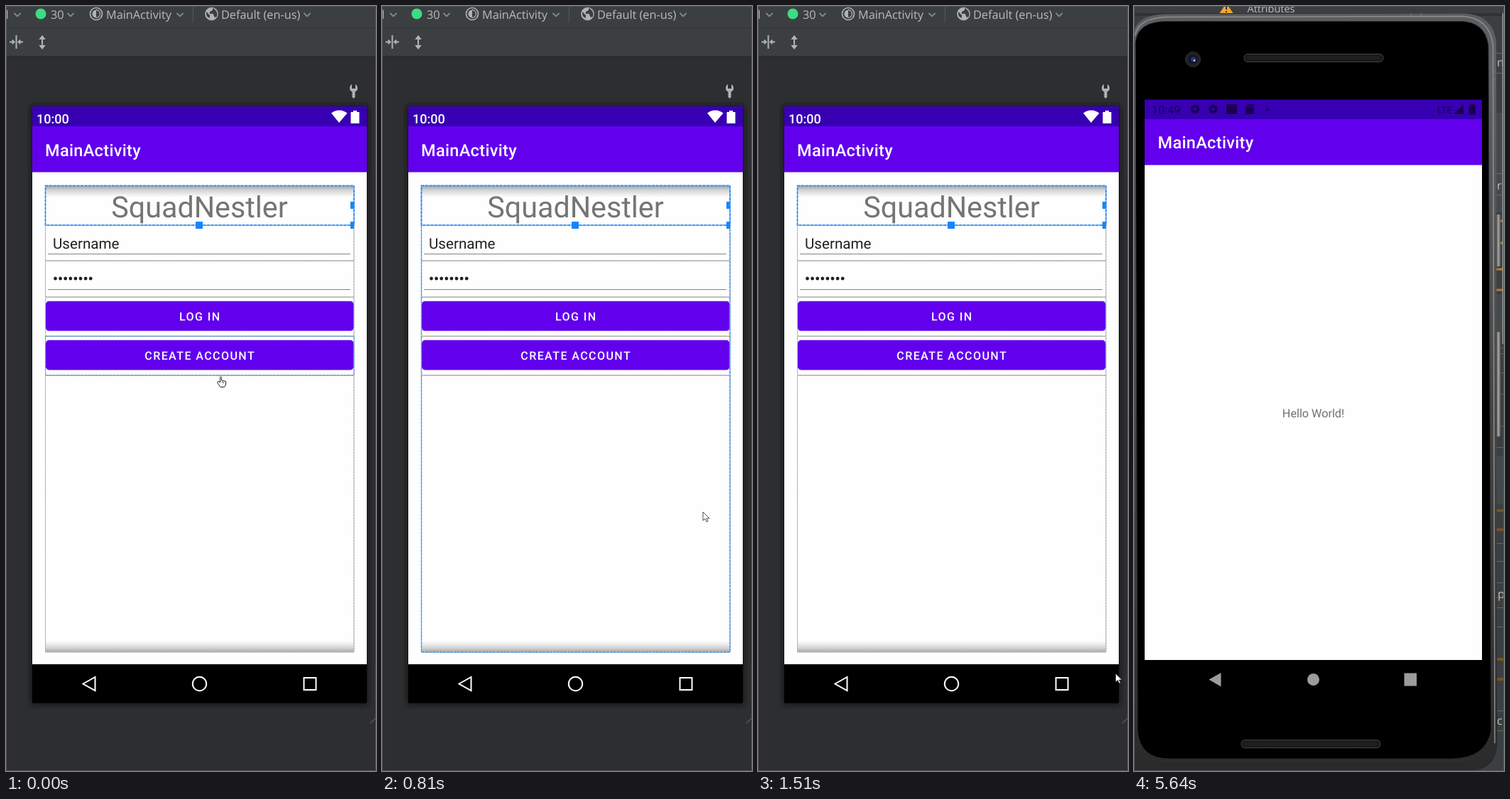
These frames come from a looping animation (521 by 1075 pixels, 8 s). An HTML page:

```html
<!DOCTYPE html>
<html lang="en">
<head>
<meta charset="utf-8">
<style>
  html, body { margin: 0; width: 100%; height: 100%; overflow: hidden; background: #2d2e30; }
  svg { display: block; width: 521px; height: 1075px; font-family: Roboto, sans-serif; text-rendering: geometricPrecision; }
  .ide { font: 16.25px 'Open Sans', sans-serif; fill: #bbb; }
  .mid { text-anchor: middle; }
  .bar { font-size: 23.5px; font-weight: 500; letter-spacing: .32px; fill: #fff; }
  .button { font-size: 16px; font-weight: 500; letter-spacing: 1.43px; fill: #fff; text-anchor: middle; }
  .bounds { fill: none; stroke: #cbcbcb; }
  .dashed { fill: none; stroke: #adadad; stroke-dasharray: 3 1; }
  .hover { fill: none; stroke: #4f9ae2; stroke-dasharray: 4 1; }
  .hidden { display: none; }
</style>
</head>
<body>
<svg viewBox="0 0 521 1075">
  <defs>
    <linearGradient id="shade" x2="0" y2="1">
      <stop offset="0" stop-color="#a6a6a6"/><stop offset=".35" stop-color="#d2d2d2"/>
      <stop offset=".75" stop-color="#efefef"/><stop offset="1" stop-color="#fdfdfd"/>
    </linearGradient>
    <linearGradient id="metal" x2="0" y2="1">
      <stop offset="0" stop-color="#5c5d5e"/><stop offset=".06" stop-color="#606162"/>
      <stop offset=".5" stop-color="#484848"/><stop offset="1" stop-color="#2a2a2a"/>
    </linearGradient>
    <linearGradient id="key">
      <stop offset="0" stop-color="#444"/><stop offset=".5" stop-color="#aaa"/><stop offset="1" stop-color="#555"/>
    </linearGradient>
    <filter id="blur" x="-5%" y="-5%" width="110%" height="110%"><feGaussianBlur stdDeviation="3"/></filter>
    <path id="chevron" d="M-4.5-2L0 2.5 4.5-2" fill="none" stroke="#85888a" stroke-width="1.8"/>
    <path id="gear" d="M0-5V5M-5 0H5M-3.6-3.6L3.6 3.6M-3.6 3.6L3.6-3.6" stroke-width="3.4" stroke-linecap="round"/>
    <path id="dividers" d="M55 358H490M55 409H490M55 464H490M55 519H490"/>
    <path id="layout" d="M55.5 252.5H490V908H55.5Z"/>
    <path id="title" d="M55.5 252.5H490V308H55.5Z"/>
    <g id="grille">
      <rect width="196" height="11" rx="5" fill="#191919" stroke="#444"/>
      <path d="M5 3.5H191M5 5.5H191M5 7.5H191" stroke="#303030" stroke-dasharray="1 1"/>
    </g>
  </defs>

  <g id="editor">
    <path d="M0 0H521V1075H0Z" fill="#2d2e30"/>
    <path d="M0 0H521V70H0Z" fill="#3c3f41"/>
    <path d="M0 30.5H521" stroke="#323436"/>
    <path d="M0 70.5H521" stroke="#2a2b2d"/>
    <path d="M263.5 0V23" stroke="#55585a"/>

    <g class="ide">
      <text x="-.5" y="17.5">l</text><text x="63" y="17.5">30</text>
      <text x="141" y="17.5">MainActivity</text><text x="303" y="17.5">Default (en-us)</text>
    </g>
    <use href="#chevron" x="16" y="12"/><use href="#chevron" x="91" y="12"/>
    <use href="#chevron" x="245" y="12"/><use href="#chevron" x="424" y="12"/>
    <circle cx="49" cy="11" r="7.5" fill="#3ddc84"/>
    <circle cx="127" cy="11" r="8.5" fill="none" stroke="#afb1b3" stroke-width="1.7"/>
    <path d="M127 5.5A5.5 5.5 0 0 0 127 16.5Z" fill="#afb1b3"/>
    <path d="M127 5.5A5.5 5.5 0 0 1 127 16.5" fill="none" stroke="#afb1b3" stroke-width="1.3"/>
    <circle cx="289.5" cy="11" r="9.3" fill="#afb1b3"/>
    <path d="M282 8l5 5v4q-6-2-5-9M291 3v3l-4 2v3h5l1 4 3 1q3-5 0-9l-3-3" fill="#3c3f41"/>
    <g stroke="#afb1b3" fill="#afb1b3">
      <path d="M14.5 41V60M5 50.5H10M19 50.5H24M51 46V56" stroke-width="2"/>
      <path d="M9 47.5l3.5 3-3.5 3zM20 47.5l-3.5 3 3.5 3zM47 46.5l4-5 4 5zM47 55.5l4 5 4-5z"/>
    </g>
    <path d="M487 110q-3 2-3 5.5 0 3.5 3.5 5V128q2 3 4 0V120.5q3.5-1.5 3.5-5 0-3.5-3-5.5v6h-5z" fill="#afb1b3"/>

    <path d="M35 140H510V982H35Z" fill="#151617" filter="url(#blur)"/>
    <path d="M37 141H508V979H37Z" fill="#fefefe"/>
    <path d="M37 141H508V169H37Z" fill="#3700b3"/>
    <path d="M37 169H508V233.5H37Z" fill="#6200ee"/>
    <path d="M37 925H508V979.5H37Z"/>
    <text x="43" y="165" font-size="18" font-weight="500" fill="#fff">10:00</text>
    <path d="M458 150.5Q469 142.5 480.5 150.5L469 164ZM485.5 149h3.5v-2h5v2h3.5v16h-12z" fill="#fff"/>
    <text class="bar" x="55" y="210.5">MainActivity</text>

    <rect x="55" y="253" width="435" height="16" fill="url(#shade)"/>
    <rect x="55" y="-908" width="435" height="16" transform="scale(1 -1)" fill="url(#shade)"/>
    <use href="#layout" class="bounds"/><use href="#layout" class="dashed"/>
    <use href="#dividers" class="bounds" stroke-width="2"/><use href="#dividers" class="dashed"/>

    <text class="mid" x="272.5" y="297" font-size="41.25" fill="#757575">SquadNestler</text>
    <text x="66" y="341" font-size="20.6" fill="#212121">Username</text>
    <path d="M69.5 383H121" stroke="#212121" stroke-width="4.8" stroke-linecap="round" stroke-dasharray="0 7.1"/>
    <path d="M59 348.5H485M59 398.5H485" stroke="#858585"/>
    <rect x="56" y="414.7" width="433.5" height="41.8" rx="4.5" fill="#6200ee"/>
    <rect x="56" y="469.6" width="433.5" height="41.8" rx="4.5" fill="#6200ee"/>
    <text class="button" x="273.2" y="442">LOG IN</text>
    <text class="button" x="273.2" y="497">CREATE ACCOUNT</text>

    <path id="overButton" class="hover" d="M55.5 464H490V519H55.5Z"/>
    <use id="overLayout" href="#layout" class="hover" stroke-width="1.5"/>
    <g fill="none" stroke-width="1.5">
      <use href="#title" stroke="#8cc2fa"/><use href="#title" stroke="#1886f7" stroke-dasharray="4 1.5"/>
    </g>
    <path d="M267 303h10v10h-10zM485 275h5v10h-5zM485 303h5v10h-5z" fill="#1886f7"/>

    <g fill="none" stroke="#fff" stroke-width="2">
      <path d="M108.5 952.5L125.5 943V962ZM419.5 944H436.5V961H419.5Z"/><circle cx="272.5" cy="952.5" r="9.7"/>
    </g>
    <path id="grip" d="M513 1008L521 1000"/>

    <g id="hand"><path d="M4 9V1.5Q5-.5 6 1.5V6l6 1.5V12l-2 3.5H4.5L.5 10 .5 8 2 7.5Z" fill="#fff" stroke="#222"/><path d="M7 7v3M9 8v2.5" stroke="#444" stroke-width=".8"/></g>
    <g id="sliver" fill="none" stroke="#222"><path d="M0 0L9 9"/><path d="M2 9l3 0M4 11l3-1M5 13l2-1" stroke="#999"/></g>
    <path id="arrow" d="M0 0V12L3 9.5 5 14 7 13 5 9H9Z" fill="#fff" stroke="#222" stroke-width=".8"/>
  </g>

  <g id="emulator">
    <path d="M0 0H521V1075H0Z" fill="#3c3f41"/>
    <path d="M0 10H521V14H0Z" fill="#2f3133"/>
    <path d="M130-4L139.5 10H120.5Z" fill="#f0a732"/><path d="M130 0V5M130 7V9" stroke="#333" stroke-width="2"/>
    <text class="ide" x="159.5" y="9" style="font-size:14.5px">Attributes</text>
    <g class="ide">
      <path d="M510 150H521V290H510ZM510 405H521V460H510ZM510 632H521V700H510Z" fill="#45494b"/>
      <text x="511" y="85">n</text><text x="511" y="258">r</text><text x="506" y="832">\p</text><text x="511" y="1010">c</text>
      <path d="M510 66.5H521M510 94.5H521M510 235.5H521M510 265.5H521M510 480.5H521M510 488.5H521M510 515.5H521M510 545.5H521M510 590.5H521M510 620.5H521M510 755.5H521M510 780.5H521M510 810.5H521M510 845.5H521M510 872.5H521M510 990.5H521M510 1018.5H521" stroke="#65686a"/>
      <path d="M510 302H521M510 333H521M510 370H521M510 399H521" stroke="#c07c18" stroke-width="3"/>
      <path d="M510 709H521M510 736H521M510 918H521M510 946H521" stroke="#765321" stroke-width="4"/>
      <path d="M519.5 10V475" stroke="#929496" stroke-width="2"/>
    </g>
    <rect x="510" y="293" width="6" height="73" rx="2" fill="url(#key)"/>
    <rect x="510" y="458" width="6" height="147" rx="2" fill="url(#key)"/>

    <path d="M0 36Q5 13 42 11.5L465 10.5Q505 12 510 50L511.5 1040Q508 1075 470 1075H0Z" fill="url(#metal)"/>
    <path d="M1 42Q6 17 45 15.5L462 14.5Q500 16 505.5 54L508 1036" fill="none" stroke="#8d8e8f" stroke-width="1.5"/>
    <path d="M2 50Q6 22 45 21.5H460Q494 22 499 55L503 1018Q496 1057 448 1058H50Q9 1058 5 1020Z" stroke="#2f2f2f"/>
    <path d="M15 1053Q24 1061 50 1061H448Q476 1061 490 1049" fill="none" stroke="#333"/>
    <path d="M390 10V16M404 10V16M504 92H510M504 103H510" stroke="#777"/>
    <use href="#grille" x="155" y="67.5"/><use href="#grille" x="151" y="1031.5"/>
    <circle cx="83" cy="75" r="10.5" fill="#202124" stroke="#303030"/>
    <circle cx="83" cy="75" r="6.5" fill="#10152c"/><circle cx="83.5" cy="75" r="3.5" fill="#29356b"/><circle cx="85" cy="76.5" r="1.5" fill="#a9b8e8"/>

    <path d="M15 132H490V919H15Z" fill="#fefefe"/>
    <path d="M15 131.5H490V159H15Z" fill="#3700b3"/>
    <path d="M15 159H490V223.5H15Z" fill="#6200ee"/>
    <g fill="#190050">
      <text x="25" y="151.5" font-size="16.2">10:49</text>
      <text x="427" y="150.5" font-size="13.5">LTE</text>
      <g stroke="#190050"><use href="#gear" x="86" y="145"/><use href="#gear" x="111.5" y="145"/></g>
      <circle cx="86" cy="145" r="2.3" fill="#3700b3"/><circle cx="111.5" cy="145" r="2.3" fill="#3700b3"/>
      <path d="M130 138H145V152H130ZM161 138H169V152H157V142ZM464 138V152H450ZM471.5 139.5h2.500v-2h4.500v2h2.500V152.500h-9.500z"/>
      <path d="M161 140v3M164 140v3M167 140v3" stroke="#3700b3"/>
      <circle cx="188" cy="145.5" r="2"/>
    </g>
    <text class="bar" x="33.5" y="200">MainActivity</text>
    <text class="mid" x="252.5" y="578" font-size="16.2" fill="#707070">Hello World!</text>
    <g fill="#9c9c9c"><path d="M105.5 946.5L122.5 937V956.5ZM380.5 937.5H398V955.5H380.5Z"/><circle cx="252.5" cy="946.5" r="8.5"/></g>
  </g>

  <path d="M.5 0V1074.5H520.5V0M0 .5H521" fill="none" stroke="#515456"/>
</svg>
<script>
  const LOOP = 8000, EMULATOR_AT = 5640, GRIP_AT = 3510;
  // start time, hover outline, cursor, cursor position
  const steps = [
    [0, "overButton", "hand", 297.5, 520],
    [440, "overButton", "hand", 359.5, 513],
    [680, "overLayout", "sliver", 452, 711],
    [810, "overLayout", "arrow", 452, 711],
    [1240, "overLayout", "arrow", 520, 791],
    [1360, "", "arrow", 510.5, 911.5],
    [1510, "", "arrow", 503.5, 938],
    [3390, "", "", 0, 0]
  ];
  const get = id => document.getElementById(id);
  const show = (id, on) => get(id).classList.toggle("hidden", !on);

  function draw(now) {
    const t = now % LOOP;
    const [, hover, cursor, x, y] = steps.findLast(step => t >= step[0]);
    show("editor", t < EMULATOR_AT);
    show("emulator", t >= EMULATOR_AT);
    for (const id of ["overButton", "overLayout"]) show(id, id === hover);
    for (const id of ["hand", "sliver", "arrow"]) show(id, id === cursor);
    if (cursor) get(cursor).setAttribute("transform", `translate(${x} ${y})`);
    get("grip").setAttribute("stroke", t < GRIP_AT ? "#77797b" : "#1698f0");
    requestAnimationFrame(draw);
  }
  draw(0);
</script>
</body>
</html>
```
